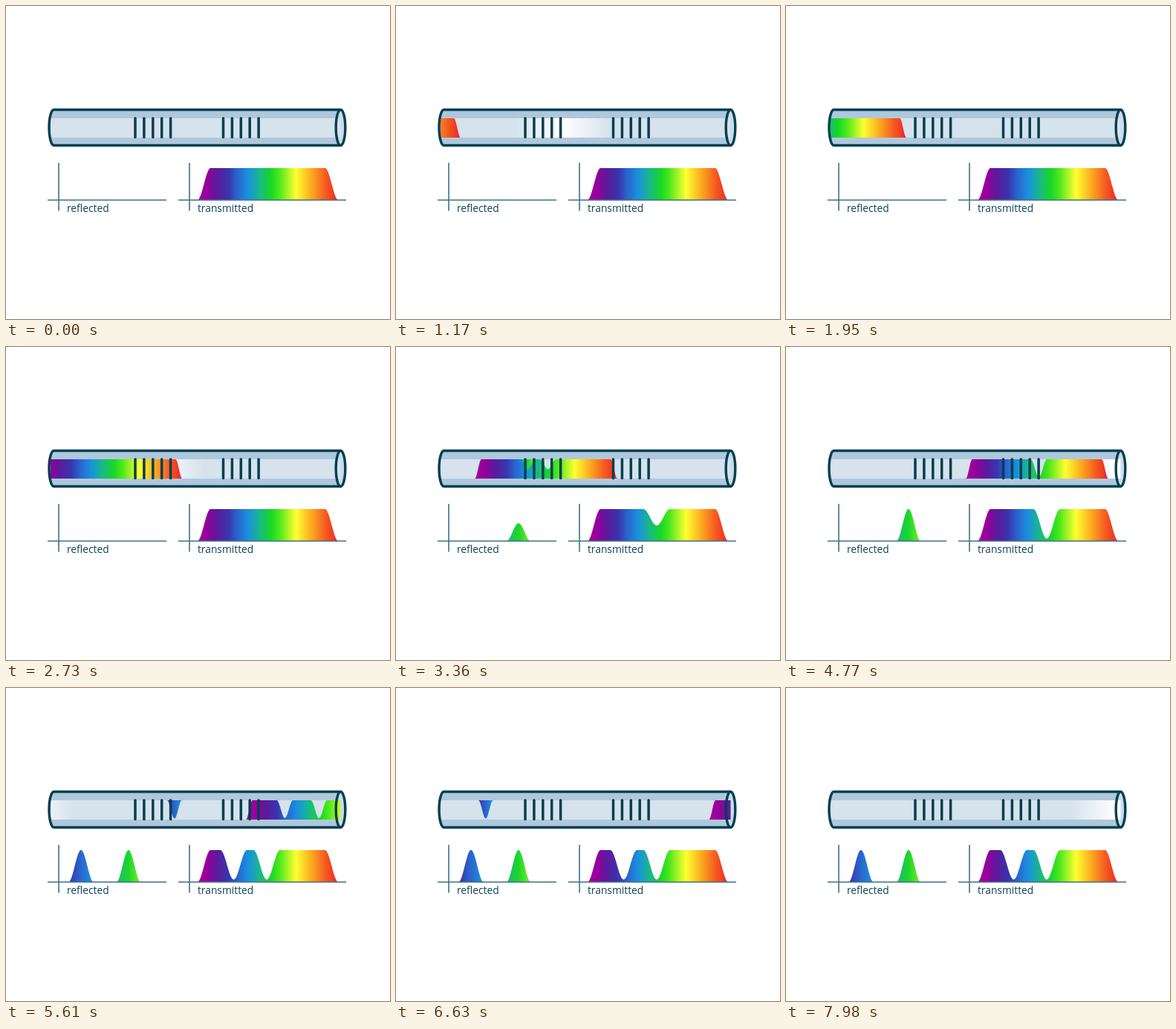
An HTML page with a canvas for the animation above (8 s loop, 517 by 421 pixels).

```html
<!DOCTYPE html>
<html lang="en">
<head>
<meta charset="utf-8">
<title>Fibre gratings</title>
<style>
  html, body { margin: 0; width: 517px; height: 421px; overflow: hidden; background: #fff; }
  canvas { display: block; width: 517px; height: 421px; }
</style>
</head>
<body>
<canvas id="stage"></canvas>
<script>
const W = 517, H = 421, LOOP = 8000;
const INK = '#003f52';
const canvas = document.getElementById('stage');
const ctx = canvas.getContext('2d');
const dpr = window.devicePixelRatio || 1;
canvas.width = W * dpr;
canvas.height = H * dpr;

const RAINBOW = [
  [0, '#a8009c'], [.07, '#96009c'], [.14, '#5b1a9c'], [.22, '#3a34ac'], [.28, '#2a62cc'],
  [.36, '#1a90de'], [.44, '#18b88c'], [.52, '#18d628'], [.58, '#4ae81c'], [.7, '#ffff30'],
  [.82, '#fba21e'], [.91, '#f65a22'], [.97, '#f0381f'], [1, '#c8187c']
];
const GREEN = [[0, '#20b47c'], [.5, '#1cd62c'], [1, '#7cf02a']];
const BLUE = [[0, '#3a30a6'], [.45, '#2a62cc'], [1, '#1a96de']];

// Reflection events: when each colour band separates from the pulse
const GREEN_AT = 3227, BLUE_AT = 4872, FADE = 250;

const clamp = v => Math.max(0, Math.min(1, v));
const ramp = v => .5 - .5 * Math.cos(Math.PI * clamp(v));
const bump = d => 1 - ramp(Math.abs(d));

function gradient(x, width, stops) {
  const g = ctx.createLinearGradient(x, 0, x + width, 0);
  for (const [at, color] of stops) g.addColorStop(at, color);
  return g;
}

// Fills the area between a base line and a curve; negative height hangs down
function area(x, base, width, height, stops, curve) {
  ctx.beginPath();
  ctx.moveTo(x, base);
  for (let u = 0; u <= width; u += .5) ctx.lineTo(x + u, base - height * curve(u));
  ctx.lineTo(x + width, base);
  ctx.fillStyle = gradient(x, width, stops);
  ctx.fill();
}

function spectrum(x, base, width, height, edge, notchWidth, notches) {
  area(x, base, width, height, RAINBOW, u => {
    let y = ramp(u / edge) * ramp((width - u) / edge);
    for (const [center, depth] of notches) y *= 1 - .92 * depth * bump((u - center) / notchWidth);
    return y;
  });
}

function peak(center, base, halfWidth, height, stops) {
  area(center - halfWidth, base, 2 * halfWidth, height, stops, u => bump(u / halfWidth - 1));
}

function line(x1, y1, x2, y2, width, color, cap = 'butt') {
  ctx.beginPath();
  ctx.moveTo(x1, y1);
  ctx.lineTo(x2, y2);
  ctx.lineWidth = width;
  ctx.strokeStyle = color;
  ctx.lineCap = cap;
  ctx.stroke();
}

function bodyPath() {
  ctx.beginPath();
  ctx.moveTo(450.5, 139.5);
  ctx.lineTo(64.5, 139.5);
  ctx.ellipse(64.5, 163.5, 6.5, 24, 0, -Math.PI / 2, Math.PI / 2, true);
  ctx.lineTo(450.5, 187.5);
}

function capPath() {
  ctx.beginPath();
  ctx.ellipse(450.5, 163.5, 6.3, 24, 0, 0, 2 * Math.PI);
}

function whitePulse(t) {
  if (t < 750) return;
  const x = .543 * ((t - 750) % 1600) - 70;
  ctx.fillStyle = gradient(x, 130, [[0, '#fff0'], [.5, '#ffff'], [1, '#fff0']]);
  ctx.fillRect(x, 151, 130, 26);
}

function fibre(t, green, blue) {
  bodyPath();
  ctx.fillStyle = '#afc8dc';
  ctx.fill();
  capPath();
  ctx.fillStyle = '#cbdbe8';
  ctx.fill();

  ctx.save();
  bodyPath();
  ctx.clip();
  ctx.beginPath();
  ctx.rect(60, 150, 393, 28);
  ctx.clip();
  ctx.fillStyle = '#d6e2ec';
  ctx.fillRect(58, 151, 400, 26);
  whitePulse(t);
  spectrum(-30 + .0964 * (t - 1950), 177, 192, 26, 9, 11, [[52.5, blue], [98.5, green]]);
  if (green) peak(109 - .104 * (t - 4020), 151, 10, -24.5 * green, GREEN);
  if (blue) peak(227 - .104 * (t - 5610), 151, 10, -24.5 * blue, BLUE);
  ctx.restore();

  for (const start of [174, 292.5])
    for (let i = 0; i < 5; i++) {
      const x = start + 11.9 * i;
      line(x, 151, x, 176.5, 3.5, INK, 'round');
    }

  ctx.strokeStyle = INK;
  ctx.lineWidth = 3.4;
  bodyPath();
  ctx.stroke();
  capPath();
  ctx.stroke();
}

function axes(x, left, right, label) {
  line(x, 211, x, 275.5, 1.6, '#3c7187');
  line(left, 261, right, 261, 1.6, '#3c7187');
  ctx.fillStyle = '#0b4257';
  ctx.font = '13.8px "Open Sans", "Noto Sans", sans-serif';
  ctx.fillText(label, x + 11, 277);
}

function charts(green, blue) {
  if (blue) peak(101, 261, 17, 43 * blue, BLUE);
  if (green) peak(165, 261, 16.5, 43 * green, GREEN);
  spectrum(257.5, 261, 190, 43, 18, 18, [[49, blue], [93.5, green]]);
  axes(71, 56, 216, 'reflected');
  axes(247, 232, 458, 'transmitted');
}

function draw(now) {
  const t = now % LOOP;
  const green = ramp((t - GREEN_AT) / FADE);
  const blue = ramp((t - BLUE_AT) / FADE);
  ctx.setTransform(dpr, 0, 0, dpr, 0, 0);
  ctx.fillStyle = '#fff';
  ctx.fillRect(0, 0, W, H);
  fibre(t, green, blue);
  charts(green, blue);
}

const begin = performance.now();
function tick() {
  draw(performance.now() - begin);
  requestAnimationFrame(tick);
}
tick();
</script>
</body>
</html>
```
